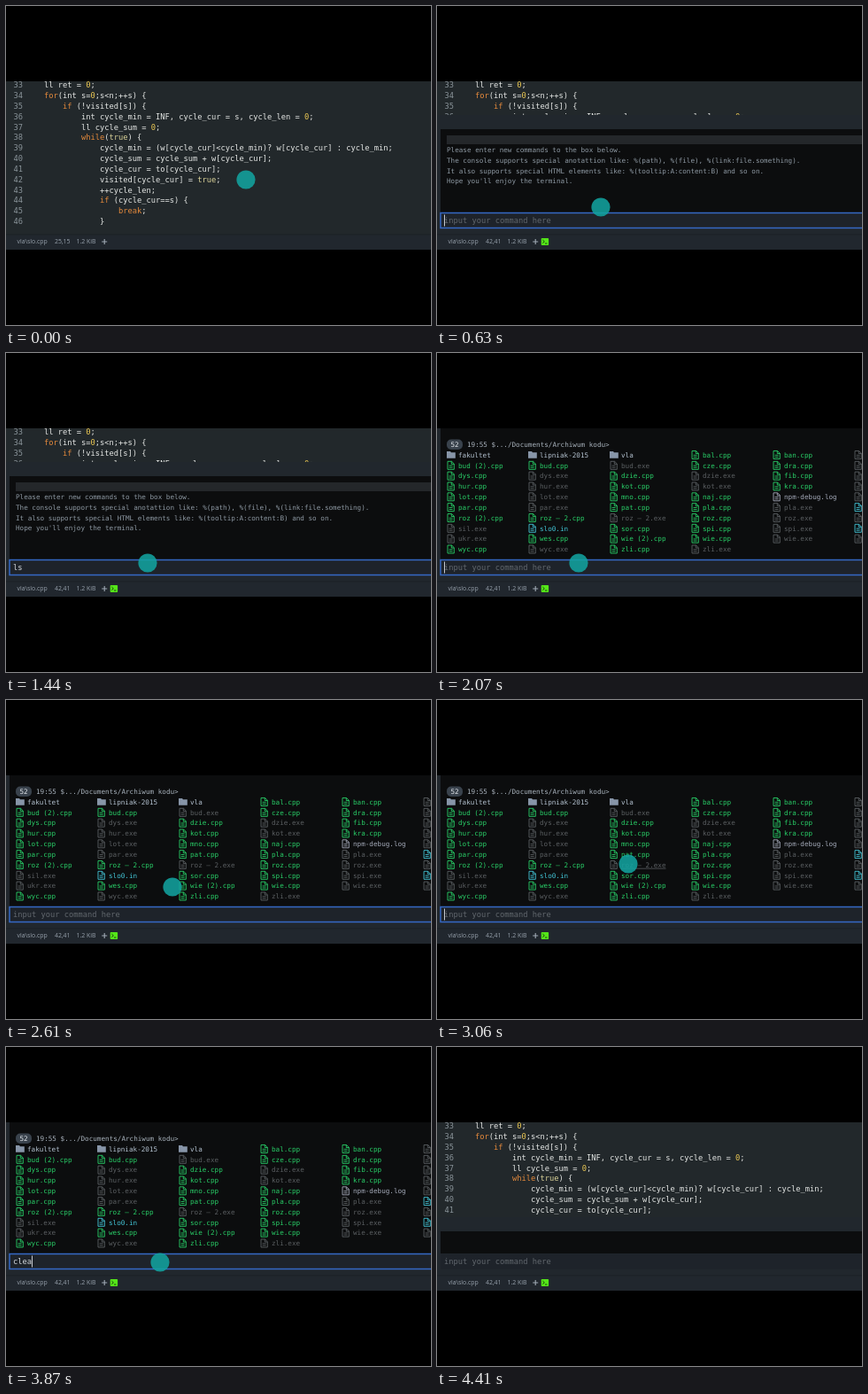
An HTML page for the animation above (4500 ms loop, 480 px wide and 360 px high).

```html
<!DOCTYPE html>
<html lang="en">
<head>
<meta charset="utf-8">
<title>Editor terminal</title>
<style>
html, body { margin: 0; width: 100%; height: 100%; overflow: hidden; background: #000; }
svg { display: block; width: 100%; height: 100%; }
text { white-space: pre; }
.code { font: 8.72px "DejaVu Sans Mono", monospace; fill: #e6e8e6; stroke: #e6e8e6; stroke-width: .12px; }
.code tspan { stroke: none; }
.num { font: 8.72px "DejaVu Sans Mono", monospace; fill: #899399; }
.con { font: 7.64px "DejaVu Sans Mono", monospace; fill: #8e99a3; }
.inp { font: 8.72px "DejaVu Sans Mono", monospace; fill: #d5dae0; }
.bar { font: 6.9px "Open Sans", sans-serif; fill: #98a2ad; }
</style>
</head>
<body>
<svg id="stage" viewBox="0 0 480 360"></svg>
<script>
const LOOP = 4500, STEP = 90, ROW = 11.83;
const stage = document.getElementById("stage");

function add(parent, tag, attrs, content) {
  const node = document.createElementNS("http://www.w3.org/2000/svg", tag);
  for (const key in attrs) node.setAttribute(key, attrs[key]);
  if (content !== undefined) node.textContent = content;
  parent.appendChild(node);
  return node;
}
const group = parent => add(parent, "g", {});
const rect = (p, x, y, width, height, fill, more) =>
  add(p, "rect", { x, y, width, height, fill, ...more });
const text = (p, x, y, cls, str, more) => add(p, "text", { x, y, class: cls, ...more }, str);
const path = (p, d, stroke, width = 1) =>
  add(p, "path", { d, fill: "none", stroke, "stroke-width": width });
const show = (node, on) => node.setAttribute("visibility", on ? "inherit" : "hidden");

// Code editor
const code = [
  [1, "ll ret = 0;"],
  [1, "for(int s=0;s<n;++s) {"],
  [2, "if (!visited[s]) {"],
  [3, "int cycle_min = INF, cycle_cur = s, cycle_len = 0;"],
  [3, "ll cycle_sum = 0;"],
  [3, "while(true) {"],
  [4, "cycle_min = (w[cycle_cur]<cycle_min)? w[cycle_cur] : cycle_min;"],
  [4, "cycle_sum = cycle_sum + w[cycle_cur];"],
  [4, "cycle_cur = to[cycle_cur];"],
  [4, "visited[cycle_cur] = true;"],
  [4, "++cycle_len;"],
  [4, "if (cycle_cur==s) {"],
  [5, "break;"],
  [4, "}"]
];
function tokenColor(word) {
  if (/^(for|if|while|break)$/.test(word)) return "#e58a3c";
  if (word === "true") return "#dcd49a";
  return /^\d+$/.test(word) ? "#f0cc55" : null;
}
rect(stage, 0, 85, 480, 173, "#22282b");
code.forEach(([indent, line], i) => {
  const y = 92.2 + i * ROW;
  text(stage, 8.5, y, "num", 33 + i);
  const row = text(stage, 22 + indent * 21, y, "code", "");
  for (const part of line.split(/\b/)) {
    const fill = tokenColor(part);
    add(row, "tspan", fill ? { fill } : {}, part);
  }
});

// Terminal panel
const panel = group(stage);
const back = rect(panel, 0, 123, 480, 135, "#21272d");
const consoleBox = rect(panel, 4, 139, 476, 95, "#0c0d0e");

const intro = group(panel);
rect(intro, 11, 146, 469, 10, "#24272a");
[
  "Please enter new commands to the box below.",
  "The console supports special anotattion like: %(path), %(file), %(link:file.something).",
  "It also supports special HTML elements like: %(tooltip:A:content:B) and so on.",
  "Hope you'll enjoy the terminal."
].forEach((line, i) => text(intro, 11, 165 + i * ROW, "con", line));

const listing = group(panel);
rect(listing, 11, 97.5, 18, 11.5, "#39424c", { rx: 5 });
text(listing, 15.4, 106, "con", "52", { fill: "#e0e5ea", style: "fill:#e0e5ea" });
text(listing, 34, 106, "con", "19:55 $.../Documents/Archiwum kodu>", { style: "fill:#a8b2bc" });

const colors = {
  dir: "#b4c2d0", cpp: "#29cf68", exe: "#5b5f62", in: "#43c5d6", log: "#a3a9b8"
};
const files = [
  "fakultet|lipniak-2015|vla|bal.cpp|ban.cpp|.exe",
  "bud (2).cpp|bud.cpp|bud.exe|cze.cpp|dra.cpp|.exe",
  "dys.cpp|dys.exe|dzie.cpp|dzie.exe|fib.cpp|.exe",
  "hur.cpp|hur.exe|kot.cpp|kot.exe|kra.cpp|.exe",
  "lot.cpp|lot.exe|mno.cpp|naj.cpp|npm-debug.log|.exe",
  "par.cpp|par.exe|pat.cpp|pla.cpp|pla.exe|.in",
  "roz (2).cpp|roz – 2.cpp|roz – 2.exe|roz.cpp|roz.exe|.exe",
  "sil.exe|slo0.in|sor.cpp|spi.cpp|spi.exe|.in",
  "ukr.exe|wes.cpp|wie (2).cpp|wie.cpp|wie.exe|.exe",
  "wyc.cpp|wyc.exe|zli.cpp|zli.exe"
];
let hoverFile;
files.forEach((line, r) => line.split("|").forEach((name, c) => {
  const x = 11 + c * 92, y = 115 + r * ROW;
  const type = name.includes(".") ? name.split(".").pop() : "dir";
  const fill = colors[type];
  if (type === "dir") {
    add(listing, "path", { d: `M${x} ${y - 4}h4l1 1.3h4.8v6.4h-9.8z`, fill: "#8795a8" });
  } else {
    path(listing, `M${x + 1} ${y - 4.5}h4.6l2.7 2.7v6.3h-7.3zM${x + 5.3} ${y - 4.5}v3h3` +
      `M${x + 2.6} ${y + .3}h4M${x + 2.6} ${y + 2.4}h4`, fill, .9);
  }
  if (c === 5) return;
  const label = text(listing, x + 13, y + 2.8, "con", name, { style: "fill:" + fill });
  if (name === "roz – 2.exe") hoverFile = label;
}));

// Command box
const field = rect(panel, 4, 233.5, 482, 17, "#1e232a", { "stroke-width": 1.5 });
const typed = text(panel, 8, 245.2, "inp", "");
const caret = rect(panel, 8, 235.5, .9, 13, "#d8dde3");

// Status bar
rect(stage, 0, 258, 480, 17, "#21272e");
rect(stage, 0, 257.5, 480, .8, "#1a1f24");
text(stage, 12.5, 268.3, "bar", "vla\\slo.cpp");
const place = text(stage, 55, 268.3, "bar", "");
text(stage, 79.5, 268.3, "bar", "1.2 KiB");
path(stage, "M108.2 266h6M111.2 263v6", "#a0aab4", 1.1);
const badge = group(stage);
rect(badge, 117.7, 262, 8.4, 8, "#55e619", { rx: .8 });
path(badge, "M119.4 264l1.9 1.8l-1.9 1.8M122 268h2.4", "#16350c", .9);

const pointer = add(stage, "circle", { r: 10.6, fill: "#12a3a0", opacity: .87 });
rect(stage, 0, 0, 480, 85, "#000");
rect(stage, 0, 275, 480, 85, "#000");

// Motion tables: [time, value...]
const moves = [
  [0, 271, 196], [90, 271, 196], [360, 111, 266], [450, 111, 266],
  [630, 185, 227], [810, 160, 237], [2340, 160, 237], [2880, 216, 185],
  [3240, 216, 185], [3510, 174, 243], [4230, 174, 243], [4410, 170, 292]
];
const typing = [
  [0, ""], [810, "l"], [900, "ls"], [1980, ""], [3600, "c"], [3690, "cl"],
  [3780, "cle"], [3870, "clea"], [3960, "clear"], [4140, ""]
];
// top edge of the panel, then its contents
const views = [
  [0, null, ""], [360, 123, "intro"], [1980, 85, "list"], [4140, 192, ""]
];
const at = (table, t) => table.filter(row => row[0] <= t).pop();

function pointerAt(t) {
  const i = moves.findIndex(m => m[0] > t);
  if (i < 0) return moves[moves.length - 1].slice(1);
  const [t0, x0, y0] = moves[i - 1], [t1, x1, y1] = moves[i];
  const k = (t - t0) / (t1 - t0), e = k * k * (3 - 2 * k);
  return [x0 + (x1 - x0) * e, y0 + (y1 - y0) * e];
}

function draw(t) {
  const [, top, view] = at(views, t);
  const open = top !== null;
  show(panel, open);
  show(badge, open);
  show(intro, view === "intro");
  show(listing, view === "list");
  if (open) {
    const boxTop = view === "list" ? 85 : top + 16;
    back.setAttribute("y", top);
    back.setAttribute("height", 258 - top);
    consoleBox.setAttribute("y", boxTop);
    consoleBox.setAttribute("height", 233 - boxTop);
  }

  const [since, word] = at(typing, t);
  const focused = t >= 450 && t < 4320;
  typed.textContent = word || "input your command here";
  typed.style.fill = word ? "" : "#62686e";
  field.setAttribute("stroke", focused ? "#3568c4" : "none");
  caret.setAttribute("x", 8 + word.length * 5.25);
  show(caret, open && focused && (t - Math.max(since, 450)) % 1060 < 530);

  place.textContent = t < 90 ? "25,15" : "42,41";
  const [x, y] = pointerAt(t);
  pointer.setAttribute("cx", x);
  pointer.setAttribute("cy", y);
  const hover = view === "list" && Math.hypot(x - 216, y - 185) < 9;
  hoverFile.style.textDecoration = hover ? "underline" : "none";
}

const start = performance.now();
function tick() {
  const t = (performance.now() - start) % LOOP;
  draw(Math.floor(t / STEP) * STEP);
  requestAnimationFrame(tick);
}
tick();
</script>
</body>
</html>
```
